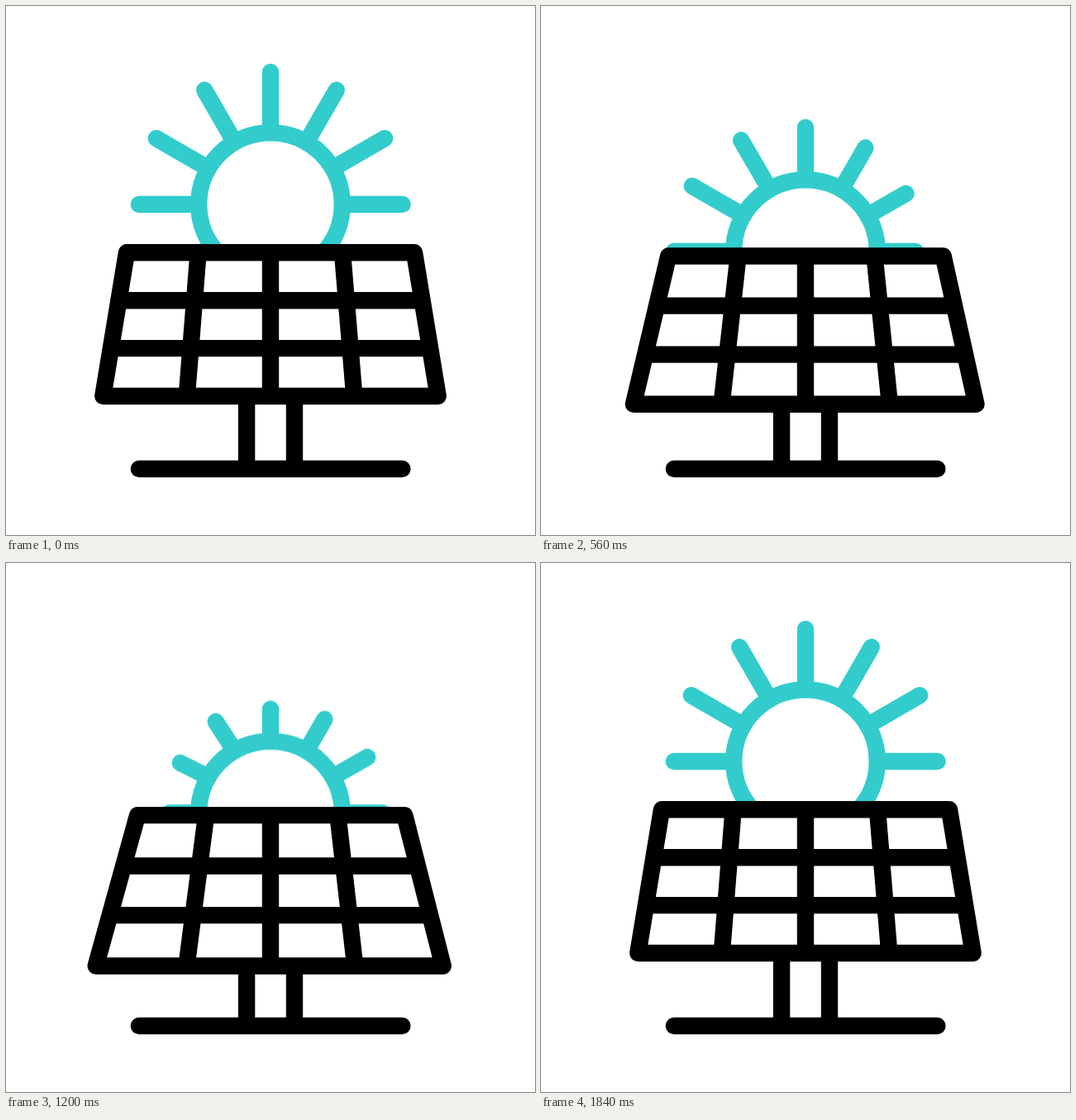
These frames come from a looping animation (640 px wide and 640 px high, 2000 ms). An HTML page without scripts:

```html
<!DOCTYPE html>
<html lang="en">
<head>
<meta charset="utf-8">
<title>Solar panel</title>
<style>
  html, body { margin: 0; width: 100%; height: 100%; overflow: hidden; background: #fff; }
  svg { display: block; width: 100vw; height: 100vh; }
  svg * { fill: none; stroke-width: 20.4; stroke-linecap: round; stroke-linejoin: round; }

  .sun { stroke: #3cc; animation: sink 2s infinite cubic-bezier(.32, 0, .48, 1); }
  .panel, .stand { stroke: #000; }
  .panel, .bars, .ray { animation: 2s infinite cubic-bezier(.333, 0, .667, 1); }
  .bars, .legs { stroke-linecap: butt; }

  @keyframes sink {
    0%, 4%, 92%, 100% { transform: translateY(0); }
    48% { transform: translateY(82px); }
  }

  /* The panel tilts towards the viewer */
  .panel { animation-name: tilt; }
  .bars { stroke: #000; animation-name: tilt-bars; }
  @keyframes tilt {
    0%, 4%, 92%, 100% { d: path("M146 298.2L494 298.2L522.7 472L117.3 472Z"); }
    50% { d: path("M161.3 306.3L480.3 306.3L529.8 490.2L107.2 490.2Z"); }
  }
  @keyframes tilt-bars {
    0%, 4%, 92%, 100% {
      d: path("M136.5 356.2L503.5 356.2M127 414.1L513 414.1M232.6 298.2L218.8 472M320 298.2L320 472M407 298.2L421.3 472");
    }
    50% {
      d: path("M143.2 368.2L497 368.2M125.5 428.1L513 428.1M243.7 306.3L218.4 490.2M320 306.3L320 490.2M400.5 306.3L422.4 490.2");
    }
  }

  /* Rays shorten one after another, 80 ms apart, from right to left */
  .r1 { animation-name: ray1; }
  .r2 { animation-name: ray2; }
  .r3 { animation-name: ray3; }
  .r4 { animation-name: ray4; }
  .r5 { animation-name: ray5; }
  .r6 { animation-name: ray6; }
  .r7 { animation-name: ray7; }
  @keyframes ray1 {
    0%, 4%, 92%, 100% { d: path("M407 240L479.6 240"); }
    40% { d: path("M407 240L443.6 240"); }
  }
  @keyframes ray2 {
    0%, 8%, 92%, 100% { d: path("M395.1 196.6L458.2 160.2"); }
    44% { d: path("M395.1 196.6L429.8 176.9"); }
  }
  @keyframes ray3 {
    0%, 12%, 92%, 100% { d: path("M363.4 164.9L399.8 101.8"); }
    48% { d: path("M363.4 164.9L382.3 132.2"); }
  }
  @keyframes ray4 {
    0%, 16%, 92%, 100% { d: path("M320 153L320 80"); }
    52% { d: path("M320 153L320 118.5"); }
  }
  @keyframes ray5 {
    0%, 20%, 92%, 100% { d: path("M276.6 164.9L240.2 101.8"); }
    56% { d: path("M276.6 164.9L254.2 130.6"); }
  }
  @keyframes ray6 {
    0%, 24%, 92%, 100% { d: path("M244.9 196.6L181.8 160.2"); }
    60% { d: path("M244.9 196.6L210.8 179.5"); }
  }
  @keyframes ray7 {
    0%, 28%, 92%, 100% { d: path("M233 240L160.9 240"); }
    64% { d: path("M233 240L198.9 240"); }
  }
</style>
</head>
<body>
<svg viewBox="0 0 640 640">
  <clipPath id="sky"><rect width="640" height="300"/></clipPath>
  <g clip-path="url(#sky)">
    <g class="sun">
      <circle cx="320" cy="240" r="86.8"/>
      <path class="ray r1" d="M407 240L479.6 240"/>
      <path class="ray r2" d="M395.1 196.6L458.2 160.2"/>
      <path class="ray r3" d="M363.4 164.9L399.8 101.8"/>
      <path class="ray r4" d="M320 153L320 80"/>
      <path class="ray r5" d="M276.6 164.9L240.2 101.8"/>
      <path class="ray r6" d="M244.9 196.6L181.8 160.2"/>
      <path class="ray r7" d="M233 240L160.9 240"/>
    </g>
  </g>
  <path class="stand legs" d="M291.1 481V560M349 481V560"/>
  <path class="stand" d="M160.9 560H479.4"/>
  <path class="bars" d="M136.5 356.2L503.5 356.2M127 414.1L513 414.1M232.6 298.2L218.8 472M320 298.2L320 472M407 298.2L421.3 472"/>
  <path class="panel" d="M146 298.2L494 298.2L522.7 472L117.3 472Z"/>
</svg>
</body>
</html>
```
